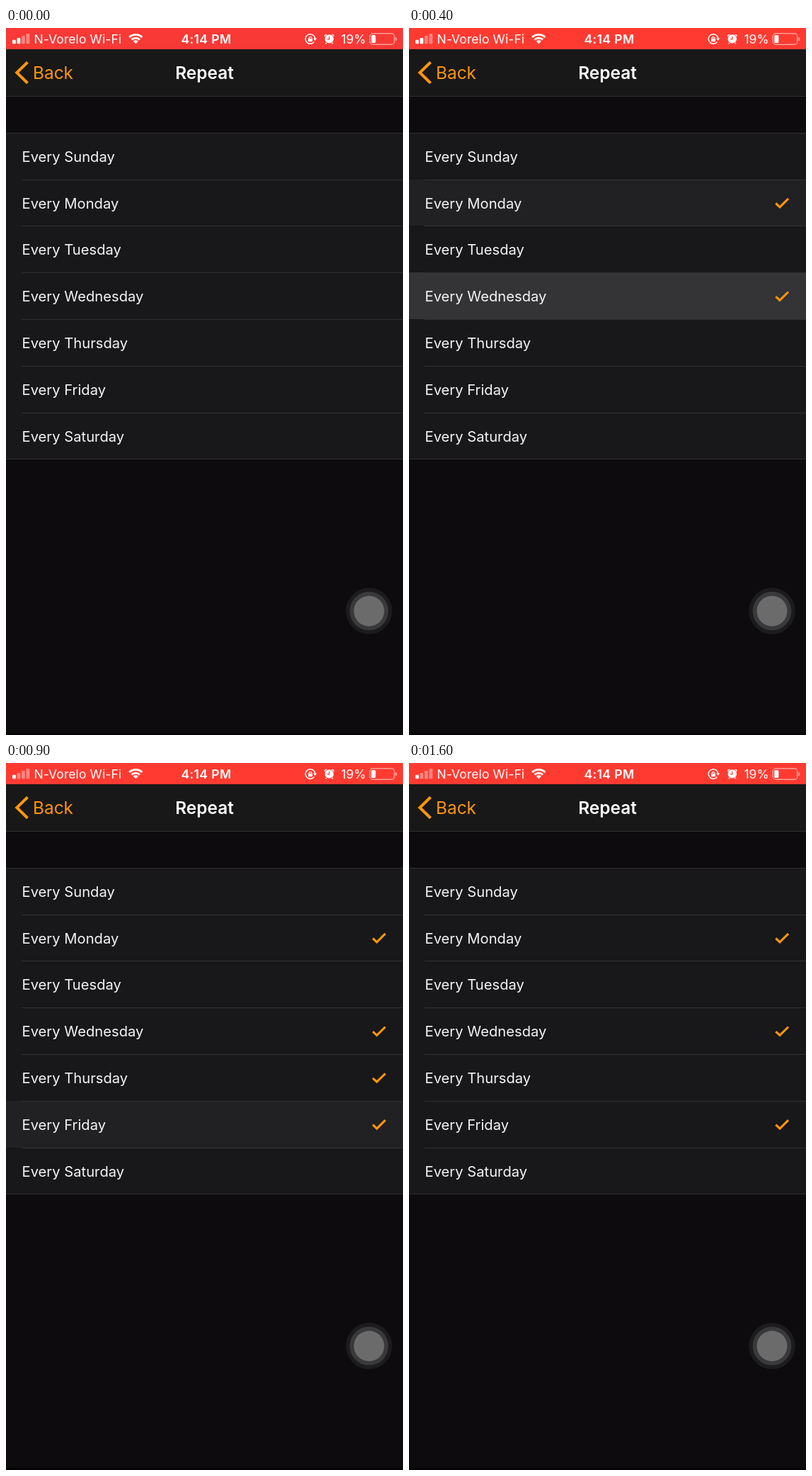
Write an HTML page with a canvas that moves like this. It is 561 px wide and 998 px high and loops after 1700 ms.

```html
<!DOCTYPE html>
<html lang="en">
<head>
<meta charset="utf-8">
<title>Repeat</title>
<style>
  html, body { margin: 0; width: 100%; height: 100%; overflow: hidden; background: #0d0b0e; }
  canvas { display: block; }
</style>
</head>
<body>
<canvas id="stage" width="561" height="998"></canvas>
<script>
const ctx = document.getElementById('stage').getContext('2d');
const W = 561, H = 998;
const LOOP = 1700, STEP = 100, FADE = 300;
const ORANGE = '#ff960a';
const DIM = 'rgba(255,255,255,0.38)';
const LIST_TOP = 148.2, ROW_H = 65.8;
const DAYS = ['Sunday', 'Monday', 'Tuesday', 'Wednesday', 'Thursday', 'Friday', 'Saturday'];

// Each tap toggles a row and lights it up briefly.
const TAPS = [
  { row: 1, at: 200 },
  { row: 3, at: 400 },
  { row: 4, at: 500 },
  { row: 5, at: 700 },
  { row: 4, at: 1300 }
];

function rect(x, y, w, h, color) {
  ctx.fillStyle = color;
  ctx.fillRect(x, y, w, h);
}

function box(x, y, w, h, r) {
  ctx.beginPath();
  ctx.roundRect(x, y, w, h, r);
}

function disc(x, y, r, color) {
  ctx.fillStyle = color;
  ctx.beginPath();
  ctx.arc(x, y, r, 0, Math.PI * 2);
  ctx.fill();
}

function arc(x, y, r, from, to, width, color = '#fff') {
  ctx.strokeStyle = color;
  ctx.lineWidth = width;
  ctx.beginPath();
  ctx.arc(x, y, r, from, to);
  ctx.stroke();
}

function polyline(points, width, color) {
  ctx.strokeStyle = color;
  ctx.lineWidth = width;
  ctx.beginPath();
  points.forEach(([x, y]) => ctx.lineTo(x, y));
  ctx.stroke();
}

function text(str, x, y, size, { weight = 400, color = '#fff', align = 'left', spacing = 0 } = {}) {
  ctx.font = `${weight} ${size}px Inter, "Liberation Sans", sans-serif`;
  ctx.letterSpacing = spacing + 'px';
  ctx.textAlign = align;
  ctx.fillStyle = color;
  ctx.fillText(str, x, y);
}

function drawSignal(strength) {
  for (let i = 0; i < 4; i++) {
    const h = 5.5 + i * 2.9;
    ctx.fillStyle = i < strength ? '#fff' : DIM;
    box(9 + i * 6.5, 22.3 - h, 4.8, h, 1);
    ctx.fill();
  }
}

function drawWifi(x, y) {
  const up = -Math.PI / 2, spread = 0.78;
  for (const r of [13, 8.2]) arc(x, y, r, up - spread, up + spread, 2.8);
  ctx.fillStyle = '#fff';
  ctx.beginPath();
  ctx.moveTo(x, y);
  ctx.arc(x, y, 5, up - spread, up + spread);
  ctx.fill();
}

function drawRotationLock(x, y) {
  arc(x, y, 6.8, 0.65, Math.PI * 2 - 0.1, 1.5);
  ctx.fillStyle = '#fff';
  ctx.beginPath();
  ctx.moveTo(x + 4, y - 1);
  ctx.lineTo(x + 9.2, y - 1);
  ctx.lineTo(x + 6.6, y + 2.4);
  ctx.fill();
  rect(x - 3, y - 0.7, 6, 4.4, '#fff');
  arc(x, y - 1, 1.9, Math.PI, Math.PI * 2, 1.2);
}

function drawAlarm(x, y, red) {
  disc(x - 4.4, y - 4.3, 2.4, '#fff');
  disc(x + 4.4, y - 4.3, 2.4, '#fff');
  polyline([[x - 5, y + 6.7], [x, y], [x + 5, y + 6.7]], 1.8, '#fff');
  disc(x, y, 7, red);
  disc(x, y, 6.2, '#fff');
  polyline([[x, y - 3.6], [x, y + 0.4], [x - 2.8, y + 0.4]], 1.2, red);
}

function drawBattery() {
  ctx.strokeStyle = 'rgba(255,255,255,0.5)';
  ctx.lineWidth = 1.5;
  box(514.2, 7.7, 34.6, 15.6, 4.2);
  ctx.stroke();
  ctx.fillStyle = '#fff';
  box(516.3, 9.9, 6, 11.2, 1.6);
  ctx.fill();
  ctx.fillStyle = 'rgba(255,255,255,0.5)';
  box(550.4, 13, 2, 5.2, [0, 2, 2, 0]);
  ctx.fill();
}

function drawStatusBar(t) {
  const red = t < 100 ? '#f83935' : '#ff3b31';
  rect(0, 0, W, 30, red);
  drawSignal(t < 700 ? 2 : 1);
  text('N-Vorelo Wi-Fi', 39.5, 22, 17.5, { spacing: 0.1 });
  drawWifi(183.3, 22.3);
  text('4:14 PM', 283, 22, 17.5, { weight: 600, align: 'center', spacing: 0.4 });
  drawRotationLock(430, 15.5);
  drawAlarm(456.8, 15.4, red);
  text('19%', 473.5, 22, 17.5);
  drawBattery();
}

function drawNavBar() {
  rect(0, 30, W, 66, '#181819');
  rect(0, 96, W, 1, '#2f2f30');
  polyline([[30.5, 48.3], [15.3, 63], [30.5, 77.7]], 4, ORANGE);
  text('Back', 38, 72, 24.4, { color: ORANGE });
  text('Repeat', 280.5, 72, 24.4, { weight: 600, align: 'center' });
}

function rowState(row, t) {
  const taps = TAPS.filter(tap => tap.row === row && tap.at <= t);
  const last = taps[taps.length - 1];
  return {
    checked: taps.length % 2 === 1,
    glow: last ? Math.max(0, 1 - (t - last.at) / FADE) : 0
  };
}

function drawList(t) {
  const edge = i => Math.floor(LIST_TOP + i * ROW_H);
  const states = DAYS.map((_, row) => rowState(row, t));
  states.forEach(({ glow }, i) => {
    const v = Math.round(23 + 28 * glow);
    rect(0, edge(i), W, edge(i + 1) - edge(i) + 1, `rgb(${v + 1},${v},${v + 2})`);
  });
  for (let i = 0; i <= DAYS.length; i++) {
    const inset = i % DAYS.length ? 22 : 0;
    rect(inset, edge(i), W - inset, 1, '#313032');
  }
  states.forEach(({ checked }, i) => {
    const y = 181.4 + i * ROW_H;
    text('Every ' + DAYS[i], 22.5, y + 7.3, 20.2, { color: '#f5f5f6' });
    if (checked) polyline([[518.3, y + 0.3], [524, y + 5.6], [536, y - 6.3]], 3.1, ORANGE);
  });
}

function drawTouchButton() {
  disc(513, 823, 32.7, '#1c1b1e');
  disc(513, 823, 27.3, '#39383a');
  disc(513, 823, 21.5, '#6c6b6c');
}

function draw(t) {
  rect(0, 0, W, H, '#0d0b0e');
  rect(0, 995, W, 3, '#040404');
  drawStatusBar(t);
  drawNavBar();
  drawList(t);
  drawTouchButton();
}

const start = performance.now();
function frame() {
  const t = (performance.now() - start) % LOOP;
  draw(Math.floor(t / STEP) * STEP);
  requestAnimationFrame(frame);
}
frame();
</script>
</body>
</html>
```
